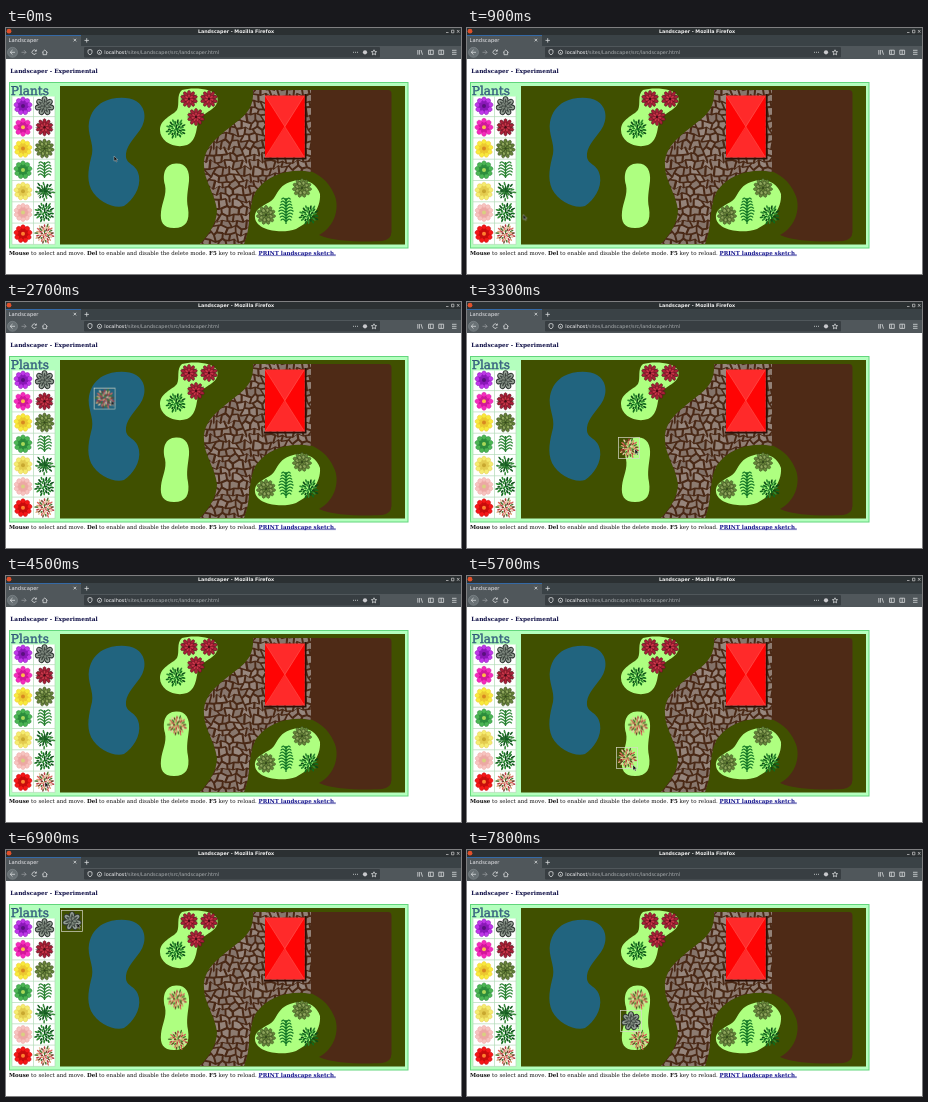
Write an HTML page that moves like this. It is 455x246 px and loops after 8000 ms.

```html
<!DOCTYPE html>
<html lang="en">
<head>
<meta charset="utf-8">
<title>Landscaper</title>
<style>
html, body { margin: 0; width: 100%; height: 100%; overflow: hidden; background: #fff; }
svg { display: block; width: 455px; height: 246px; }
text { text-rendering: geometricPrecision; }
.ui { font-family: "DejaVu Sans", sans-serif; }
.page { font-family: "DejaVu Serif", serif; }
.b { font-weight: bold; }
.icon { fill: none; stroke: #d7dadb; stroke-width: .8; }
.move, .frame { animation: 8s linear infinite; }
.frame rect { fill: none; stroke: #d8d8c8; stroke-width: .7; }

#cursor { animation-name: cursor; }
@keyframes cursor {
  0% { transform: translate(108px, 128px); animation-timing-function: steps(4); }
  15%, 22.5% { transform: translate(39px, 206px); animation-timing-function: steps(2); }
  30% { transform: translate(74px, 74px); animation-timing-function: steps(3); }
  41.25% { transform: translate(168px, 147px); animation-timing-function: steps(1); }
  45% { transform: translate(176px, 152px); animation-timing-function: steps(3); }
  56.25%, 60% { transform: translate(39px, 206px); animation-timing-function: steps(1); }
  63.75% { transform: translate(73px, 79px); animation-timing-function: steps(2); }
  71.25% { transform: translate(166px, 189px); animation-timing-function: steps(1); }
  75% { transform: translate(177px, 195px); animation-timing-function: steps(1); }
  78.75% { transform: translate(39px, 79px); animation-timing-function: steps(2); }
  86.25% { transform: translate(71px, 73px); animation-timing-function: steps(3); }
  97.5%, 100% { transform: translate(169px, 173px); }
}

#first { animation-name: first; }
@keyframes first {
  0% { transform: translate(67px, 72px); opacity: 0; animation-timing-function: step-end; }
  18.75%, 30% { transform: translate(67px, 72px); opacity: 1; animation-timing-function: steps(3); }
  41.25% { transform: translate(162px, 146px); opacity: 1; animation-timing-function: step-end; }
  45%, 100% { transform: translate(171px, 149.5px); opacity: 1; }
}
#second { animation-name: second; }
@keyframes second {
  0% { transform: translate(67px, 72px); opacity: 0; animation-timing-function: step-end; }
  60%, 63.75% { transform: translate(67px, 72px); opacity: 1; animation-timing-function: steps(2); }
  71.25% { transform: translate(160px, 182px); opacity: 1; animation-timing-function: step-end; }
  75%, 100% { transform: translate(172px, 190px); opacity: 1; }
}
#third { animation-name: third; }
@keyframes third {
  0% { transform: translate(66px, 71px); opacity: 0; animation-timing-function: step-end; }
  78.75%, 86.25% { transform: translate(66px, 71px); opacity: 1; animation-timing-function: steps(3); }
  97.5%, 100% { transform: translate(164px, 171px); opacity: 1; }
}
.frame { animation-timing-function: step-end; }
#first .frame { animation-name: frame1; }
#second .frame { animation-name: frame2; }
#third .frame { animation-name: frame3; }
@keyframes frame1 { 0%, 45%, 100% { opacity: 0; } 30% { opacity: 1; } }
@keyframes frame2 { 0%, 75%, 100% { opacity: 0; } 63.75% { opacity: 1; } }
@keyframes frame3 { 0% { opacity: 0; } 86.25%, 100% { opacity: 1; } }
</style>
</head>
<body>
<svg viewBox="0 0 455 246">
  <defs>
    <clipPath id="paving">
      <path id="walk" d="M247 62H305V144C285 140 262 146 250 163C241 180 246 197 238 216H194C203 206 211 195 211 182C209 166 198 152 198 138C197 119 212 109 228 96C242 86 248 78 247 62Z"/>
    </clipPath>
    <g id="plantDefs"></g>
  </defs>

  <!-- browser window -->
  <g class="ui">
    <rect width="455" height="7" fill="#2b3032"/>
    <circle cx="3" cy="3.2" r="2.4" fill="#e0502a"/>
    <text class="b" x="230" y="5" font-size="4.8" text-anchor="middle" fill="#f2f2f2">Landscaper - Mozilla Firefox</text>
    <path d="M440 4.500h2.500M445.500 2.200h2.400v2.600h-2.400zM451 2l2.400 2.800m0-2.800l-2.400 2.800" fill="none" stroke="#ccc" stroke-width=".7"/>
    <rect y="7" width="455" height="11" fill="#3a4246"/>
    <rect y="7" width="75" height="11" fill="#50575b"/>
    <rect y="7" width="75" height=".8" fill="#2f6fb8"/>
    <text x="2.500" y="14.200" font-size="5.200" fill="#e6e6ea">Landscaper</text>
    <path class="icon" d="M67.600 10.800l2.600 2.600m0-2.600l-2.600 2.600M78.500 12.400h4.400M80.700 10.200v4.400"/>
    <rect y="18" width="455" height="13" fill="#50575b"/>
    <rect x="78" y="19" width="296" height="10.500" rx="1" fill="#383e42"/>
    <circle cx="6.500" cy="24.300" r="5" fill="#697175" stroke="#8a9296" stroke-width=".5"/>
    <path class="icon" d="M9 24.300H4.200M6.500 22l-2.300 2.300 2.300 2.300"/>
    <path class="icon" stroke-opacity=".5" d="M15.500 24.300h4.400M18 22.200l2.100 2.100-2.100 2.100"/>
    <path class="icon" d="M30 22.800A2.200 2.200 0 1 0 30.300 25M30.400 21.600v1.600h-1.600M36 24.500l2.800-2.500 2.800 2.500M37 24v2.700h3.600V24"/>
    <path class="icon" d="M82 22.200l2-.7 2 .7v2.200q0 1.500-2 2.400q-2-.9-2-2.400z"/>
    <circle class="icon" cx="93.500" cy="24.300" r="2.100"/>
    <path class="icon" d="M93.500 24v1.300"/>
    <text x="98.300" y="26" font-size="4.920" fill="#a9adaf"><tspan fill="#f5f5f7">localhost</tspan>/sites/Landscaper/src/landscaper.html</text>
    <path class="icon" stroke-dasharray="1 1" d="M347 24.300h5"/>
    <circle cx="359" cy="24.300" r="2.100" fill="#c9c9cd"/>
    <path class="icon" d="M368 21.800l.8 1.700 1.800.2-1.400 1.200.4 1.900-1.600-1-1.600 1 .4-1.900-1.400-1.200 1.800-.2z"/>
    <path class="icon" d="M411.800 22v4.700M413.400 22v4.700M415 22l1.500 4.700M422.500 22.200h4.800v4.200h-4.800zM424.300 22.200v4.200M432.800 22.200h4.800v4.200h-4.800zM435.200 22.200v4.200M446 22.300h4.500M446 24.300h4.500M446 26.300h4.500"/>
  </g>

  <!-- page -->
  <text class="page b" x="4.300" y="45.300" font-size="5.800" fill="#0c0c44">Landscaper - Experimental</text>
  <rect x="3.500" y="54.500" width="398.500" height="165.500" fill="#b4ffbe" stroke="#62d67c"/>
  <rect x="54" y="58" width="345" height="158.500" fill="#405000"/>
  <path d="M97 74C106 69 122 68 130 73C140 79 141 92 134 102C127 112 119 119 120 129C121 137 131 136 133 148C135 160 127 172 118 178C108 181 92 174 85 161C80 150 83 138 86 126C88 115 81 106 83 94C85 84 90 78 97 74Z" fill="#21647f"/>
  <path d="M304 62H382Q385.500 62 385.500 66V204Q385 212 376 213C360 214 328 214 313 207C330 198 334 178 328 166C322 152 312 146 304 143Z" fill="#4e2a16"/>
  <use href="#walk" fill="#4a2916"/>
  <g id="stones" clip-path="url(#paving)"></g>
  <g fill="#aeff80">
    <path d="M176 62C186 59 207 60 211 68C215 80 200 83 193 91C190 97 192 112 181 117C169 121 154 114 154 102C154 91 166 88 171 82C174 76 170 67 176 62Z"/>
    <path d="M170 135.500C180 135 184 143 183 153C182 163 180 170 182 180C184 193 180 200 168 200C157 200 154 194 155 184C156 174 161 167 159 157C156 146 159 136 170 135.500Z"/>
    <path d="M284 154C296 149 310 153 314 166C315 181 304 194 290 201C276 206 251 203 249 190C248 178 263 177 268 170C273 162 275 157 284 154Z"/>
  </g>
  <path d="M299.500 66V130.500H258" fill="none" stroke="#2a1208" stroke-width="2"/>
  <rect x="259" y="67.500" width="39.500" height="62" fill="#ff2a2a"/>
  <path d="M259 67.500L279 99L259 129.500ZM298.500 67.500L279 99L298.500 129.500Z" fill="#ff0404"/>
  <path d="M259 67.500L298.500 129.500M298.500 67.500L259 129.500" stroke="#ff6058" stroke-width=".5"/>

  <rect x="6" y="68.500" width="43" height="148" fill="#fff"/>
  <path id="cells" fill="none" stroke="#b4dcb8" stroke-width=".7"/>
  <text class="page" x="4.800" y="66.600" font-size="12.100" fill="#3d6c8e" stroke="#2b4f70" stroke-width=".4">Plants</text>
  <g id="beds"></g>

  <text class="page" x="3" y="226.500" font-size="5.510" fill="#111"><tspan class="b">Mouse</tspan> to select and move. <tspan class="b">Del</tspan> to enable and disable the delete mode. <tspan class="b">F5</tspan> key to reload. <tspan class="b" fill="#16168e" text-decoration="underline">PRINT landscape sketch.</tspan></text>

  <g id="first" class="move"><use href="#mixed"/><g class="frame"><rect x="-10.500" y="-10.500" width="21" height="21"/></g></g>
  <g id="second" class="move"><use href="#mixed"/><g class="frame"><rect x="-10.500" y="-10.500" width="21" height="21"/></g></g>
  <g id="third" class="move"><use href="#agave"/><g class="frame"><rect x="-10.500" y="-10.500" width="21" height="21"/></g></g>
  <path id="cursor" class="move" d="M0 0V5.200L1.300 4.100L2.200 6L3.100 5.500L2.200 3.700H3.800Z" fill="#111" stroke="#ddd" stroke-width=".4"/>
</svg>

<script>
const byId = id => document.getElementById(id);

// repeatable noise in 0..1
const noise = (a, b) => {
  const s = Math.sin(a * 127.1 + b * 311.7) * 43758.5453;
  return s - Math.floor(s);
};

// paving: brick lattice with shared, jittered corners
const corner = (i, j) => [
  188 + i * 4 + (noise(i, j) - .5) * 4.4,
  54 + j * 6.6 + (noise(j + 50, i) - .5) * 5.2
];
function stone(i, j) {
  const pts = [[0, 0], [1, 0], [2, 0], [2, 1], [1, 1], [0, 1]].map(([a, b]) => corner(i + a, j + b));
  const mid = k => pts.reduce((s, p) => s + p[k], 0) / 6;
  const cx = mid(0), cy = mid(1);
  const d = pts.map(([x, y]) => `${cx + (x - cx) * .74} ${cy + (y - cy) * .74}`).join("L");
  const tone = 46 + noise(i, j + 9) * 9;
  return `<path d="M${d}Z" fill="hsl(22 11% ${tone}%)"/>`;
}
let stones = "";
for (let j = 0; j < 26; j++)
  for (let i = -(j % 2); i < 31; i += 2) stones += stone(i, j);
byId("stones").innerHTML = stones;

// plants
const ring = (n, len, w, fill, edge = "none", turn = 0) =>
  Array.from({ length: n }, (_, k) =>
    `<path d="M0 0C${w} ${-len * .4} ${w} ${-len} 0 ${-len}C${-w} ${-len} ${-w} ${-len * .4} 0 0Z" fill="${fill}" stroke="${edge}" stroke-width=".5" transform="rotate(${turn + k * 360 / n})"/>`).join("");

const dot = (r, fill) => `<circle r="${r}" fill="${fill}"/>`;

const flower = (n, outer, inner, eye) =>
  ring(n, 9, 3.2, outer, inner) + ring(n, 5.5, 2, inner, "none", 180 / n) + dot(2, eye);

const rosette = (dark, mid, light) =>
  ring(11, 9.6, 2.4, mid, dark) + ring(8, 7, 2.2, light, dark, 16) + ring(6, 4.2, 1.7, mid, dark) + dot(1, dark);

const spikes = (n, fill, w) =>
  Array.from({ length: n }, (_, k) => {
    const len = 7.5 + noise(k, n) * 2.8;
    return `<path d="M${-w} 0L0 ${-len}L${w} 0Z" fill="${fill}" transform="rotate(${k * 360 / n})"/>`;
  }).join("");

// fronds droop away from a central stem
function fern(fill, tall) {
  let d = "";
  for (let y = -tall; y < tall - 2; y += 3) {
    const w = 7.5 - Math.abs(y + 1) * .25;
    for (const s of [-1, 1]) d += `M0 ${y + 3}Q${s * w * .6} ${y - 2} ${s * w} ${y + 1.5}`;
  }
  return `<path d="M0 ${tall}V${-tall}${d}" fill="none" stroke="${fill}" stroke-width="1.3"/>`;
}

// small leaves on a sunflower spiral, turned outwards
function bush(colors, count, r) {
  let s = "";
  for (let k = 0; k < count; k++) {
    const q = 9 * Math.sqrt((k + .5) / count), len = r * (1 + noise(k, 3) * .6);
    s += `<ellipse cx="${q}" rx="${len}" ry="${r * .6}" fill="${colors[k % colors.length]}" transform="rotate(${k * 137.5})"/>`;
  }
  return s;
}

const plants = {
  purple: flower(9, "#bf38e8", "#8a18b8", "#5a1080"),
  magenta: flower(8, "#f52cbc", "#d0189a", "#ffb84a"),
  gold: flower(9, "#f8ea3c", "#ecc830", "#d88a20"),
  green: flower(9, "#4cb654", "#2c8c3c", "#a8d858"),
  cream: flower(9, "#f5ec70", "#e4cc50", "#c8a830"),
  pink: flower(10, "#f7c4c0", "#eca8a4", "#d8d080"),
  red: flower(9, "#f51818", "#c80c0c", "#ff8030"),
  agave: ring(7, 9.8, 4, "#2f3632") + ring(7, 9, 2.6, "#939d93") + ring(7, 7, 1.1, "#3f4842") + ring(5, 4.5, 2, "#7c867c", "#2f3632", 20),
  crimson: spikes(12, "#3c3a20", 1.5) + ring(10, 8.6, 2.2, "#a82038", "#54101c") + ring(7, 5, 1.8, "#c83448", "#6a1420") + dot(1.2, "#4a0c18"),
  olive: rosette("#34491c", "#68833a", "#8fa65c"),
  palm: fern("#2c8434", 8),
  tallFern: fern("#177a28", 13),
  leafy: spikes(11, "#246a2c", 1.4) + bush(["#145c20", "#3a8c3c"], 22, 1.4),
  shrub: bush(["#0f6a1c", "#2c8c30", "#0c4c18"], 32, 1.5),
  mixed: bush(["#b83840", "#d8a070", "#4c7430", "#d8685c", "#6c4028", "#e8c8a8"], 46, 1.3)
};
byId("plantDefs").innerHTML = Object.entries(plants).map(([id, s]) => `<g id="${id}">${s}</g>`).join("");

const put = (id, x, y) => `<use href="#${id}" x="${x}" y="${y}"/>`;
const left = ["purple", "magenta", "gold", "green", "cream", "pink", "red"];
const right = ["agave", "crimson", "olive", "palm", "leafy", "shrub", "mixed"];
const rowY = i => 78 + i * 21.3;
let beds = "", cells = "M6 68.5V216.5M27.5 68.5V216.5M49 68.5V216.5";
left.forEach((id, i) => {
  beds += put(id, 17, rowY(i)) + put(right[i], 38.5, rowY(i));
  cells += `M6 ${rowY(i) + 10.6}H49`;
});
byId("cells").setAttribute("d", cells);
beds += put("crimson", 183, 71) + put("crimson", 203, 71) + put("crimson", 190, 89)
  + put("shrub", 170, 101) + put("olive", 296, 160) + put("olive", 260, 187)
  + put("tallFern", 280, 183) + put("shrub", 303, 187);
byId("beds").innerHTML = beds;
</script>
</body>
</html>
```
